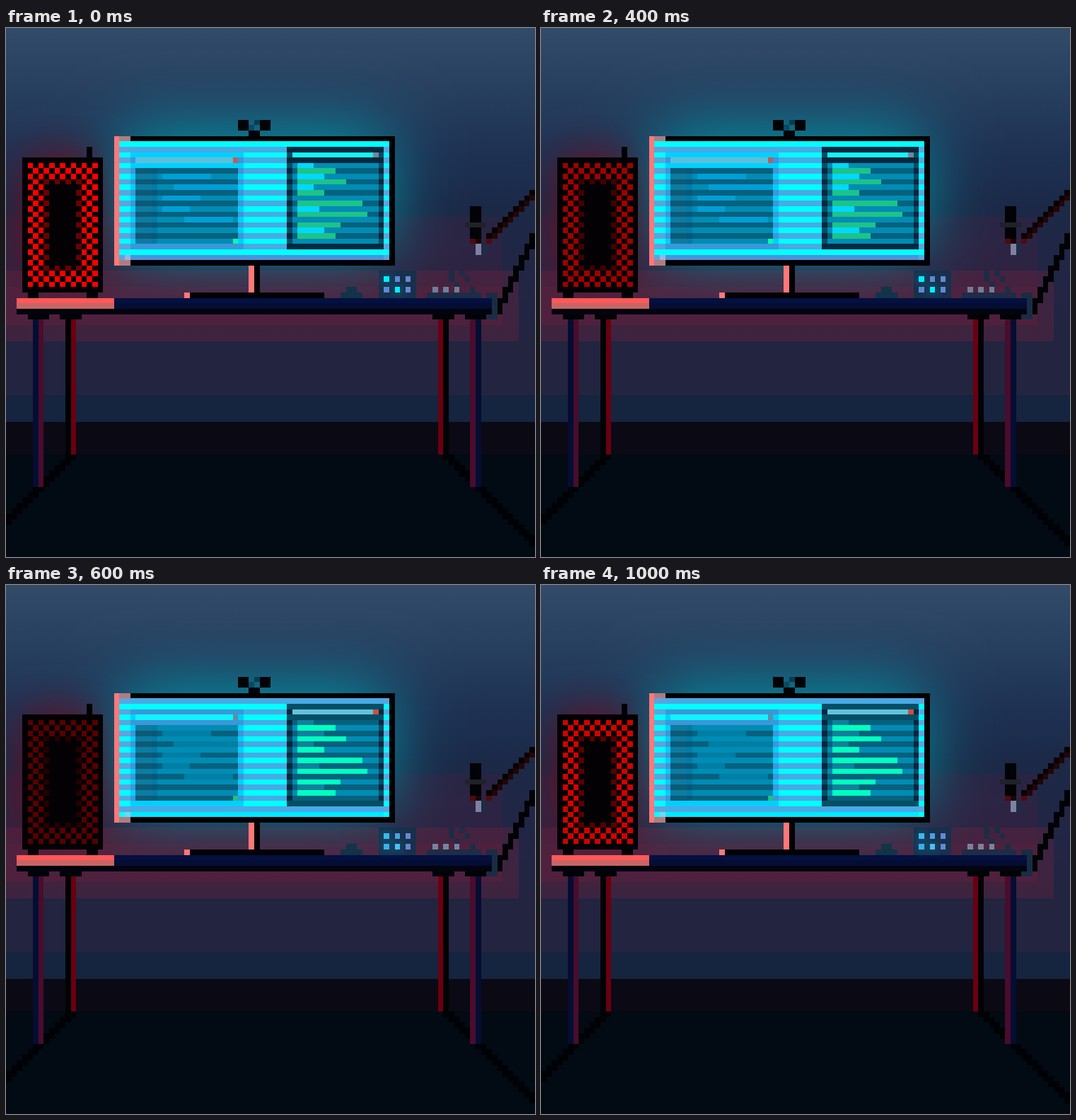
Recreate the animation shown at these times as an HTML page with a canvas. Size 748x748 px, loop 1200 ms.

```html
<!DOCTYPE html>
<html lang="en">
<head>
<meta charset="utf-8">
<title>Desk at night</title>
<style>
html, body { margin: 0; width: 100%; height: 100%; overflow: hidden; background: #020a14; }
canvas { display: block; }
</style>
</head>
<body>
<canvas id="stage" width="748" height="748"></canvas>
<script>
const SIZE = 748, CELLS = 98, UNIT = SIZE / CELLS, STEP = 200;
const ctx = document.getElementById('stage').getContext('2d');
const room = document.createElement('canvas');
room.width = room.height = SIZE;

const px = n => Math.round(n * UNIT);

// Fills a block given in grid cells.
function block(c, x, y, w, h, color) {
  c.fillStyle = color;
  c.fillRect(px(x), px(y), px(x + w) - px(x), px(y + h) - px(y));
}

// Paints only the soft halo of a rectangle, in pixels.
function glow(c, x, y, w, h, blur, color) {
  c.save();
  c.shadowColor = color;
  c.shadowBlur = blur;
  c.shadowOffsetX = 2000;
  c.fillStyle = '#000';
  c.fillRect(x - 2000, y, w, h);
  c.restore();
}

function drawWall(c) {
  const wall = c.createLinearGradient(0, 0, 0, px(58));
  [[0, '#324b69'], [.2, '#273f5f'], [.4, '#1e3153'], [.57, '#1b2947'],
   [.75, '#212645'], [1, '#222440']].forEach(s => wall.addColorStop(...s));
  block(c, 0, 0, 98, 68, wall);
  block(c, 0, 68, 98, 5, '#15243f');
  block(c, 0, 73, 98, 6, '#0b0913');
  block(c, 0, 79, 98, 19, '#020a14');
  block(c, 0, 35, 92, 20, 'rgba(120,20,50,.14)');
  block(c, 0, 45, 95, 13, 'rgba(125,35,62,.3)');
  block(c, 0, 48, 92, 7, 'rgba(125,30,60,.16)');

  c.save();
  c.beginPath();
  c.rect(0, 0, SIZE, px(50));
  c.clip();
  glow(c, 165, 145, 375, 170, 95, '#0099aa');
  glow(c, 28, 182, 96, 160, 58, 'rgba(120,8,22,.9)');
  c.restore();
}

function drawDesk(c) {
  for (let i = 0; i < 19; i++) {
    block(c, 11 - i, 79 + i, 2, 1, '#000205');
    if (i < 17) block(c, 81 + i, 79 + i, 2, 1, '#000205');
  }
  [[5, 31, '#050d33'], [6, 31, '#4a0c2c'], [11, 25, '#010206'], [12, 25, '#6a0010'],
   [80, 25, '#6a0010'], [81, 25, '#010206'], [86, 31, '#4a0c2c'], [87, 31, '#050d33']]
    .forEach(([x, h, color]) => block(c, x, 54, 1, h, color));
  [4, 10, 79, 85].forEach(x => block(c, x, 53, 4, 1, '#010206'));

  block(c, 89, 49, 2, 5, '#1a2c44');
  block(c, 20, 50, 70, 1, '#031040');
  block(c, 20, 51, 70, 1, '#040d34');
  block(c, 2, 52, 88, 1, '#02040f');
  block(c, 2, 50, 18, 1, '#ff5858');
  block(c, 2, 51, 18, 1, '#c96464');
}

function drawMic(c) {
  for (let i = 0; i < 9; i++) {
    block(c, 89 + i, 38 - i, 1, 2, '#080204');
    block(c, 89 + i, 39 - i, 1, 1, i ? '#240508' : '#500a10');
  }
  for (let i = 0; i < 7; i++) block(c, 97 - i, 38 + 2 * i, 1, 3, '#020306');
  block(c, 86, 33, 2, 6, '#020306');
  block(c, 85, 36, 4, 1, '#1f2228');
  block(c, 86, 39, 1, 1, '#500a10');
  block(c, 87, 39, 1, 1, '#1c0508');
  block(c, 87, 40, 1, 2, '#8080a0');
  block(c, 88, 40, 1, 2, '#1e2c46');
}

function drawGear(c) {
  block(c, 15, 22, 1, 2, '#020206');
  block(c, 3, 24, 15, 25, '#030104');
  [4, 15].forEach(x => block(c, x, 49, 2, 1, '#020206'));

  block(c, 43, 17, 2, 2, '#020408');
  block(c, 47, 17, 2, 2, '#020408');
  block(c, 45, 18, 1, 1, '#084a60');
  block(c, 46, 17, 1, 1, '#0a3c50');
  block(c, 45, 19, 2, 1, '#020408');

  block(c, 20, 20, 52, 24, '#000205');
  block(c, 20, 20, 1, 24, '#ff7878');
  block(c, 21, 20, 2, 1, '#b07c80');
  block(c, 21, 43, 2, 1, '#b07c80');
  block(c, 45, 44, 1, 5, '#ff7878');
  block(c, 46, 44, 1, 5, '#010206');
  block(c, 33, 49, 1, 1, '#ff7878');
  block(c, 34, 49, 25, 1, '#010206');

  block(c, 63, 48, 2, 1, '#123348');
  block(c, 62, 49, 4, 1, '#123348');
  block(c, 69, 45, 7, 5, '#18304c');

  block(c, 78, 49, 10, 1, '#1e2c46');
  block(c, 86, 48, 1, 1, '#1e2c46');
  [[82, 46], [82, 45], [84, 45], [85, 46], [83, 47]]
    .forEach(([x, y]) => block(c, x, y, 1, 1, '#1e2c46'));
}

// Grille pulse: red level of the vents per step.
const PULSE = [255, 212, 160, 88, 160, 212];

function drawVents(c, level) {
  for (let y = 25; y < 48; y++) {
    for (let x = 4; x < 17; x++) {
      if ((x + y) % 2 === 0) continue;
      if (x > 7 && x < 13 && y > 28 && y < 44) continue;
      const ring = x > 6 && x < 14 && y > 27 && y < 45;
      block(c, x, y, 1, 1, `rgb(${Math.round(level * (ring ? .42 : 1))},0,0)`);
    }
  }
}

// Colour pairs are [dim, lit] for the alternating scan lines.
const BACK = ['#48aae4', '#00ffff'];
const EDGE = ['#5ca4de', '#00ffff'];
const FRAME = ['#3a98d8', '#00d0ff'];
const BODY = ['#06617e', '#008cb4'];
const GUTTER = ['#0c5a78', '#0c7ca2'];
const CODE = ['#007ea5', '#009fd6'];
const SHELL = ['#02283e', '#044e66'];
const INFO = ['#10809c', '#00d8ff'];
const GOOD = ['#1cc488', '#00ffc0'];

// Row: [start, end] of each editor line.
const EDITOR = { 27: [29, 38], 29: [31, 43], 31: [29, 36], 33: [29, 34], 35: [33, 42] };
// Row: end of each terminal line.
const TERMINAL = { 25: 57, 26: 61, 27: 59, 28: 63, 29: 57, 30: 59,
                   32: 66, 33: 58, 34: 67, 36: 62, 37: 59, 38: 61 };

function drawScreen(c, phase) {
  for (let y = 21; y < 43; y++) {
    const lit = (y + phase) % 2;
    const run = (from, to, pair) => block(c, from, y, to - from, 1, pair[lit]);

    run(21, 71, y === 42 ? ['#4a94dc', '#00e8ff'] : BACK);
    run(21, 23, EDGE);
    run(70, 71, EDGE);

    if (y > 22 && y < 41) run(23, 44, FRAME);
    if (y === 24) {
      run(24, 42, ['#5cc0dc', '#10f4ff']);
      run(42, 43, ['#b8605c', '#5a90a8']);
    }
    if (y > 25 && y < 40) {
      run(24, 43, BODY);
      run(24, 27, GUTTER);
      run(27, 28, ['#06587a', '#007ca8']);
      if (EDITOR[y]) run(...EDITOR[y], CODE);
      if (y === 39) run(42, 43, ['#20c080', '#00ffb4']);
    }

    if (y > 21 && y < 41) run(52, 70, SHELL);
    if (y === 23) {
      run(53, 68, ['#60c4dc', '#14f4f8']);
      run(68, 69, ['#c85048', '#708898']);
    }
    if (y > 24 && y < 40) run(53, 69, BODY);
    if (TERMINAL[y]) run(54, TERMINAL[y], y % 2 ? INFO : GOOD);
  }
  block(c, 22, 42, 1, 1, phase ? '#70d8f0' : '#a4b0dc');
}

function drawLeds(c, phase) {
  const pad = phase
    ? ['#3cb8ec', '#4ca0e0', '#6688d4', '#3cb0ec', '#4cc0f0', '#6688d4']
    : ['#00f0ff', '#5c88d8', '#6488d4', '#5c88d8', '#00f0ff', '#6488d4'];
  const halos = phase ? [[70, 46], [70, 48], [72, 48]] : [[70, 46], [72, 48]];
  halos.forEach(([x, y]) => glow(c, px(x), px(y), 8, 8, 14, 'rgba(0,150,190,.9)'));
  pad.forEach((color, i) => block(c, 70 + 2 * (i % 3), i < 3 ? 46 : 48, 1, 1, color));
  [79, 81, 83].forEach(x => block(c, x, 48, 1, 1, phase ? '#7a82a0' : '#747c98'));
}

function frame(now) {
  const step = Math.floor(now / STEP) % PULSE.length;
  ctx.drawImage(room, 0, 0);
  drawVents(ctx, PULSE[step]);
  drawScreen(ctx, step % 2);
  drawLeds(ctx, step % 2);
  requestAnimationFrame(frame);
}

const still = room.getContext('2d');
[drawWall, drawDesk, drawMic, drawGear].forEach(draw => draw(still));
frame(performance.now());
</script>
</body>
</html>
```
